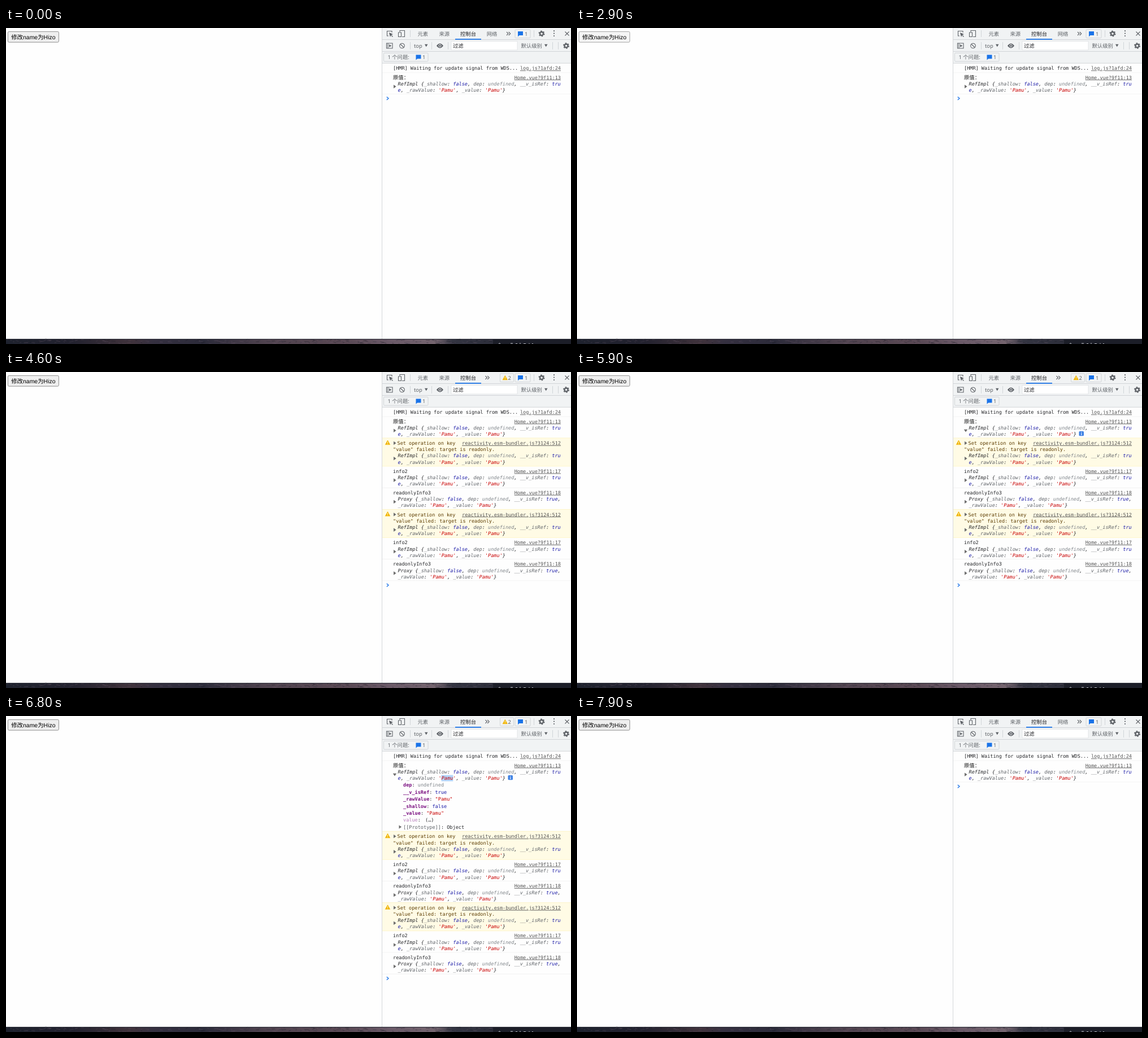
These frames come from a looping animation (1000 by 560 pixels, 8000 ms). An HTML page:

```html
<!DOCTYPE html>
<html lang="zh">
<head>
<meta charset="utf-8">
<style>
  html, body { margin: 0; width: 100%; height: 100%; overflow: hidden; background: #fefefe; }
  svg { display: block; }
  text { white-space: pre; text-rendering: geometricPrecision; }
  .ui { font: 9.36px "Noto Sans", "Noto Sans CJK SC", sans-serif; fill: #5f6368; }
  .ui.dark { fill: #202124; }
  .button { font: 10.45px "Liberation Sans", "Noto Sans CJK SC", sans-serif; fill: #000; }
  .mono { font: 8.56px "DejaVu Sans Mono", "Noto Sans CJK TC", monospace; fill: #242528; }
  .cjk { font-size: 9.36px; fill: #111; }
  .preview { font-style: italic; }
  .link { fill: #545454; text-decoration: underline .8px; text-anchor: end; }
  .warn { fill: #5c3c00; }
  .key { fill: #5f6368; }
  .bool { fill: #1a1aa6; }
  .string { fill: #c80000; }
  .undef { fill: #80868b; }
  .prop { fill: #7a0f80; font-weight: bold; }
  .getter { fill: #b77fbb; }
  .icon { fill: none; stroke: #5f6368; stroke-width: 1.1; }
  .rule { stroke: #cacdd1; stroke-width: .8; fill: none; }
  .field { stroke: #dfe1e4; stroke-width: .8; fill: #fff; }
</style>
</head>
<body>
<svg width="1000" height="560" viewBox="0 0 1000 560">
  <defs>
    <linearGradient id="desk">
      <stop offset="0" stop-color="#1e222e"/>
      <stop offset=".12" stop-color="#23222f"/>
      <stop offset=".22" stop-color="#41333c"/>
      <stop offset=".26" stop-color="#353040"/>
      <stop offset=".35" stop-color="#2c2b3a"/>
      <stop offset=".46" stop-color="#50434f"/>
      <stop offset=".6" stop-color="#594853"/>
      <stop offset=".68" stop-color="#6b5a68"/>
      <stop offset=".76" stop-color="#75656f"/>
      <stop offset=".79" stop-color="#343542"/>
      <stop offset="1" stop-color="#20222d"/>
    </linearGradient>
    <g id="gear">
      <circle r="3" fill="none" stroke="#5f6368" stroke-width="2.4"/>
      <circle r="4.7" fill="none" stroke="#5f6368" stroke-width="1.6" stroke-dasharray="2.46"/>
    </g>
    <path id="bubble" d="M0 0H9V7H2.5L0 9.3Z" fill="#1a73e8"/>
    <g id="alert">
      <path d="M0-4.2L4.3 3.6H-4.3Z" fill="#f0b400" stroke="#f0b400" stroke-width=".5" stroke-linejoin="round"/>
      <path d="M0-1.7V1.1M0 1.9V2.8" stroke="#fff" stroke-width=".9"/>
    </g>
  </defs>
  <rect width="1000" height="560" fill="#fefefe"/>
  <g id="button"></g>
  <g id="console"></g>
  <path d="M666 0H1000V62H666Z" fill="#f1f3f4"/>
  <path class="rule" d="M665.5 0V551M666 20.5H1000M666 41.5H1000M666 62.4H1000M715.5 4V16M934.5 4V16M715.5 25V38M753.5 25V38M782.5 25V38M967.5 25V38M977.5 25V38"/>
  <path d="M795 19H841V20.7H795Z" fill="#1a73e8"/>
  <g id="tabs"></g>

  <path class="icon" d="M683 8V5.5H674.5V14H677"/>
  <path d="M678 8L685 11L682 12.2L685 15L684 16L681.2 13L680 16Z" fill="#5f6368"/>
  <path class="icon" d="M697 7V4.5H705.5V15.5H701M694.5 8H699.5V15.5H694.5Z"/>
  <use href="#gear" x="948" y="10"/>
  <path d="M970 5.2V15" stroke="#5f6368" stroke-width="2.2" stroke-linecap="round" stroke-dasharray="0 4.4"/>
  <path class="icon" d="M989.5 6.5L996.5 13.5M996.5 6.5L989.5 13.5"/>

  <path class="icon" d="M673.5 27H684V36H673.5ZM676 27V36"/>
  <path d="M678 29L682.3 31.5L678 34Z" fill="#5f6368"/>
  <path class="icon" d="M705.3 31.5A4.3 4.3 0 1 1 696.7 31.5A4.3 4.3 0 1 1 705.3 31.5M698 28.5L704 34.5"/>
  <path d="M762 31.5Q768 23.5 774 31.5Q768 39.5 762 31.5Z" fill="#5f6368"/>
  <circle cx="768" cy="31.5" r="2.1" fill="#5f6368" stroke="#f1f3f4"/>
  <path class="field" d="M788 23.5H905V39H788Z"/>
  <path d="M741 28.8H746.5L743.7 33.6ZM953 28.8H958.5L955.7 33.6Z" fill="#5f6368"/>
  <use href="#gear" x="991.5" y="31.5"/>
  <rect class="rule" x="668.5" y="44.2" width="78.5" height="15" rx="1.5"/>
  <use href="#bubble" x="725.5" y="47.5"/>
  <text class="ui" x="722" y="34.8">top</text>
  <text class="ui dark" x="791" y="35.2">过滤</text>
  <text class="ui" x="911.5" y="34.8">默认级别</text>
  <text class="ui" x="675.5" y="55.2">1 个问题:</text>
  <text class="ui" x="737" y="55.2">1</text>

  <rect y="551" width="1000" height="9" fill="url(#desk)"/>
  <g id="grain"></g>
  <path d="M0 551.4H1000" stroke="#20222d"/>
  <path d="M862 552H1000V560H862Z" fill="#1c1e28"/>
  <path d="M872 560L873.5 558.3L875 560M893 559H897M902 559.6H905M910 558V560M916 559.6H920M926 558.6V560M931 559.6H933" stroke="#dcdde2" fill="none" stroke-width=".9"/>
</svg>
<script>
const LOOP = 8000;
const $ = id => document.getElementById(id);
const span = (cls, s) => `<tspan class="${cls}">${s}</tspan>`;
const text = (x, y, s, cls) => `<text x="${x}" y="${y}" class="${cls}">${s}</text>`;
const mono = (x, y, s, cls = '') => text(x, y, s, 'mono ' + cls);
const rect = (x, y, w, h, fill) => `<rect x="${x}" y="${y}" width="${w}" height="${h}" fill="${fill}"/>`;
const rule = (y, color = '#f0f0f0') => rect(666, y - .4, 334, .8, color);
const arrow = (x, y, open) =>
  `<path transform="translate(${x} ${y})${open ? ' rotate(90)' : ''}" d="M-2-3.2L2.6 0L-2 3.2Z" fill="#6e6e6e"/>`;
const use = (id, x, y) => `<use href="#${id}" x="${x}" y="${y}"/>`;
const link = (y, s) => mono(982, y, s, 'link');

const highlight = s => s.replace(/('\w+')|\b(false|true|tru$|^e\b)|\b(undefined)|(\w+)(?=:)/g,
  (m, string, bool, undef) => span(string ? 'string' : bool ? 'bool' : undef ? 'undef' : 'key', m));

const FIELDS = '{_shallow: false, dep: undefined, __v_isRef: ';
const VALUES = "_rawValue: 'Pamu', _value: 'Pamu'}";
const PREVIEWS = {
  RefImpl: [`RefImpl ${FIELDS}tru`, `e, ${VALUES}`],
  Proxy: [`Proxy ${FIELDS}true,`, VALUES],
};
const PROPS = [
  ['dep', 'undef', 'undefined'], ['__v_isRef', 'bool', 'true'], ['_rawValue', 'string', '"Pamu"'],
  ['_shallow', 'bool', 'false'], ['_value', 'string', '"Pamu"'],
];

const preview = (y, type, open) => arrow(688, y + 1.8, open) +
  PREVIEWS[type].map((s, i) => mono(693.5, y + i * 11.2, highlight(s), 'preview')).join('');

const logRow = (top, label, source, type, open) =>
  mono(685, top + 11.6, label) + link(top + 11.6, source) + preview(top + 23, type, open);

const warnRow = top => rect(666, top, 334, 50, '#fffbe5') + rule(top, '#fff5c2') + rule(top + 50, '#fff5c2') +
  use('alert', 675.5, top + 8.2) + arrow(688, top + 9) +
  mono(692.5, top + 12, 'Set operation on key', 'warn') +
  link(top + 12, 'reactivity.esm-bundler.js?3124:512') +
  mono(685, top + 23.2, '"value" failed: target is readonly.', 'warn') + preview(top + 34.4, 'RefImpl');

const clickRows = top => warnRow(top) +
  logRow(top + 50, 'info2', 'Home.vue?9f11:17', 'RefImpl') + rule(top + 88.2) +
  logRow(top + 88.2, 'readonlyInfo3', 'Home.vue?9f11:18', 'Proxy') + rule(top + 126.4);

const details = () => PROPS.map(([key, cls, value], i) =>
    mono(703, 125.2 + i * 12.5, span('prop', key) + ': ' + span(cls, value))).join('') +
  mono(703, 187.4, span('getter', 'value') + ':') + mono(742, 187.4, '(…)') +
  arrow(697.5, 196.6) + mono(703, 199.9, span('key', '[[Prototype]]') + ': Object');

function consoleView({ clicks, open, filled, selected, focused }) {
  let top = filled ? 204.3 : 117, out = '';
  if (focused) out += rect(666, 79.4, 334, 125, '#ecf1f8');
  if (selected) out += rect(770.5, 104.6, 20.8, 11, '#b4d5fa');
  out += mono(685, 74.3, '[HMR] Waiting for update signal from WDS...') + link(74.3, 'log.js?1afd:24') + rule(79) +
    logRow(79, span('cjk', '原值：'), 'Home.vue?9f11:13', 'RefImpl', open) + rule(top);
  if (open) out += '<rect x="888.5" y="105" width="8.5" height="8.3" rx="1.5" fill="#3f82e4"/>' +
    rect(892.2, 106.5, 1.2, 1.2, '#fff') + rect(892.2, 108.5, 1.2, 3.4, '#fff');
  if (filled) out += details();
  for (let i = 0; i < clicks; i++, top += 126.5) out += clickRows(top);
  return out + `<path d="M673.8 ${top + 5}L677 ${top + 7.7}L673.8 ${top + 10.4}" fill="none" stroke="#1a73e8" stroke-width="1.3"/>`;
}

function tabsView({ clicks }) {
  const label = (x, s, cls = 'ui') => text(x, 13.6, s, cls);
  const badge = (x, w) => `<rect class="rule" x="${x}" y="2.8" width="${w}" height="15" rx="1.5"/>`;
  const more = x => `<path class="icon" d="M${x} 7L${x + 3} 10L${x} 13M${x + 3.7} 7L${x + 6.7} 10L${x + 3.7} 13"/>`;
  const overflow = clicks
    ? more(848.5) + badge(874.5, 24) + use('alert', 883.3, 10.4) + label(888.5, clicks)
    : label(850.7, '网络') + more(886);
  return label(728.5, '元素') + label(766.5, '来源') + label(804, '控制台', 'ui dark') +
    overflow + badge(901, 27) + use('bubble', 906, 6) + label(918, 1);
}

const BUTTON = { idle: ['#efefef', '#767676'], hover: ['#e5e5e5', '#4f4f4f'], active: ['#f5f5f5', '#8d8d8d'] };
const buttonView = ({ button }) => {
  const [fill, stroke] = BUTTON[button];
  return `<rect x="3.4" y="6.4" width="90" height="18.8" rx="2" fill="${fill}" stroke="${stroke}" stroke-width=".8"/>` +
    text(9.2, 20, '修改name为Hizo', 'button');
};

function stateAt(t) {
  const within = (from, to) => t >= from && t < to;
  const reload = 7750;
  return {
    clicks: t >= reload ? 0 : (t >= 3000) + (t >= 4200),
    open: within(5900, reload),
    filled: within(6000, reload),
    selected: within(6700, 7000),
    focused: within(7000, reload),
    button: within(2800, 3000) || within(4100, 4200) ? 'active' : within(2300, 4400) ? 'hover' : 'idle',
  };
}

// Muted grain of the wallpaper strip.
let seed = 7;
const random = () => (seed = seed * 16807 % 2147483647) / 2147483647;
const tones = ['#14161f', '#6d5a6c', '#2a2d3c', '#55495a'];
$('grain').innerHTML = Array.from({ length: 260 }, (_, i) =>
  `<path d="M${random() * 860} ${552 + random() * 7}l${2 + random() * 6} ${random() * 4 - 2}" stroke="${tones[i % 4]}" opacity=".4"/>`).join('');

let shown;
function draw(now) {
  const state = stateAt(now % LOOP), key = JSON.stringify(state);
  if (key !== shown) {
    shown = key;
    $('console').innerHTML = consoleView(state);
    $('tabs').innerHTML = tabsView(state);
    $('button').innerHTML = buttonView(state);
  }
  requestAnimationFrame(draw);
}
draw(performance.now());
</script>
</body>
</html>
```
